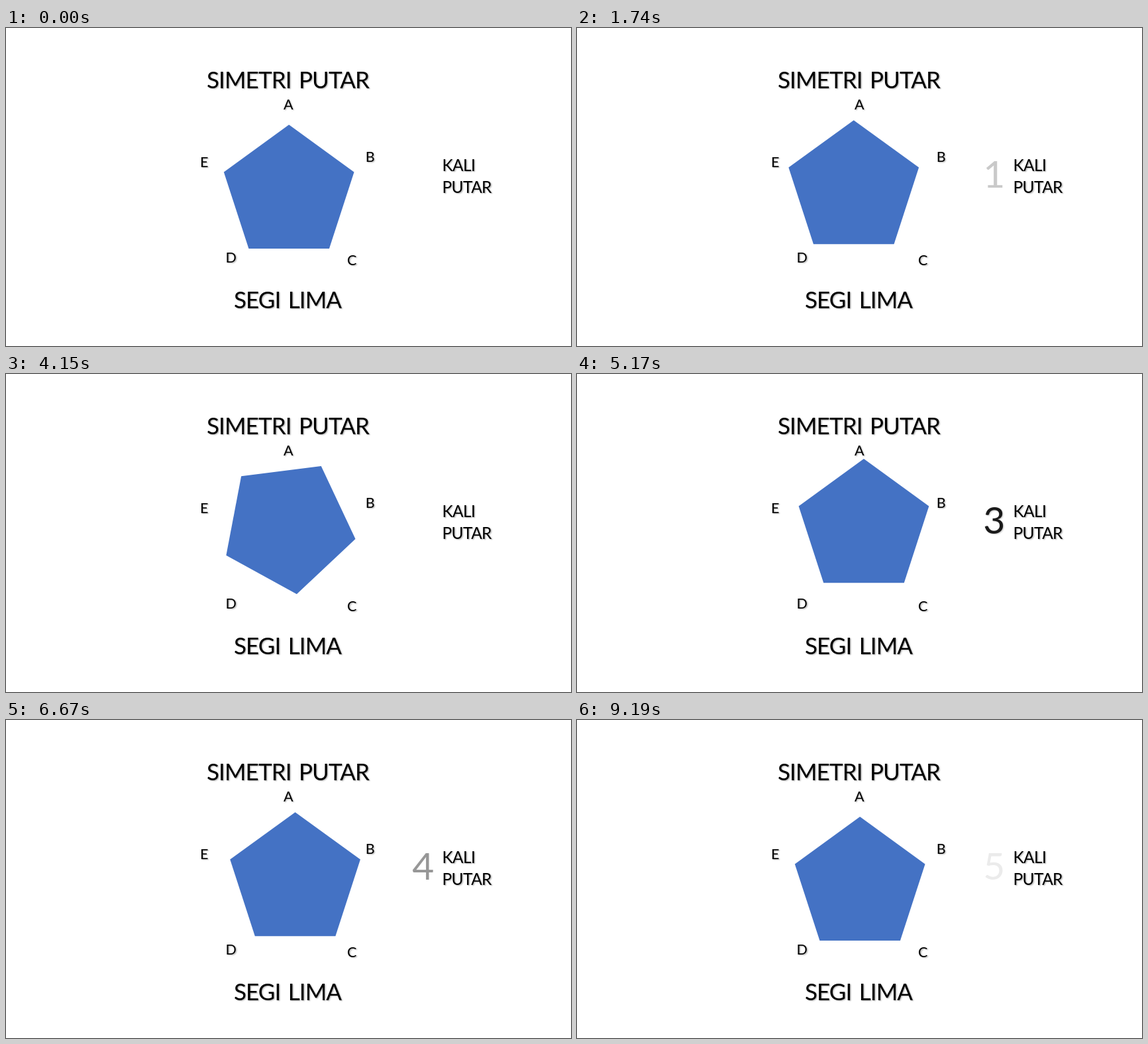
Write an HTML page with a canvas that moves like this. It is 853 by 480 pixels and loops after 9250 ms.

```html
<!DOCTYPE html>
<html lang="id">
<head>
<meta charset="utf-8">
<title>Simetri putar</title>
<style>
  html, body { margin: 0; width: 100%; height: 100%; overflow: hidden; background: #fff; }
  canvas { display: block; }
</style>
</head>
<body>
<canvas id="stage" width="853" height="480"></canvas>
<script>
const ctx = document.getElementById('stage').getContext('2d');
const LOOP = 9250, STEP = 60, HOLD_END = 3850;
const SPIN = 900, FADE = 450, GAP = 25;
const TURN = 2 * Math.PI / 5;
const starts = [30, 1860, 3790, 5590, 7393, LOOP];

// The shape turns about the middle of its bounding box, not its centroid.
const pivot = { x: 427.2, y: 239.5 }, radius = 103.4, drop = 9.9;

const clamp = v => Math.max(0, Math.min(1, v));

// Pictures advance in fixed steps, with one longer hold before the third turn.
function snap(t) {
  if (t >= HOLD_END) return HOLD_END + Math.floor((t - HOLD_END) / STEP) * STEP;
  return Math.min(Math.floor(t / STEP) * STEP, 3720);
}

// The shadow weakens faster than the glyphs, so faded text stays light.
function text(str, x, y, size, align = 'center', alpha = 1) {
  ctx.save();
  ctx.globalAlpha = alpha;
  ctx.font = `${size}px Lato, sans-serif`;
  ctx.letterSpacing = `${-0.025 * size}px`;
  ctx.wordSpacing = `${0.09 * size}px`;
  ctx.textAlign = align;
  ctx.fillStyle = '#000';
  ctx.shadowColor = `rgba(0,0,0,${0.33 * alpha ** 2})`;
  ctx.shadowOffsetX = ctx.shadowOffsetY = 1.3;
  ctx.shadowBlur = 2;
  ctx.fillText(str, x, y);
  ctx.restore();
}

function pentagon(angle) {
  ctx.save();
  ctx.translate(pivot.x, pivot.y);
  ctx.rotate(angle);
  ctx.beginPath();
  for (let i = 0; i < 5; i++) {
    ctx.lineTo(radius * Math.sin(i * TURN), drop - radius * Math.cos(i * TURN));
  }
  ctx.closePath();
  ctx.fillStyle = '#4472c4';
  ctx.fill();
  ctx.restore();
}

function draw(time) {
  const t = snap(time);
  let n = 0;
  while (n < 4 && t >= starts[n + 1]) n++;
  const local = t - starts[n];
  const length = starts[n + 1] - starts[n];

  ctx.fillStyle = '#fff';
  ctx.fillRect(0, 0, 853, 480);
  pentagon((n + clamp(local / SPIN)) * TURN);

  text('SIMETRI PUTAR', 425.5, 90.5, 35);
  text('SEGI LIMA', 425, 422.5, 35);
  text('KALI', 658.5, 215.5, 24.5, 'left');
  text('PUTAR', 658.5, 249, 24.5, 'left');
  text('A', 426, 123, 21.5);
  text('B', 549.5, 202, 21.5);
  text('C', 522, 358, 21.5);
  text('D', 339.5, 354, 21.5);
  text('E', 299, 210, 21.5);

  const alpha = clamp(Math.min((local - SPIN) / FADE, (length - GAP - local) / FADE));
  if (alpha > 0) text(String(n + 1), 629, 241, 57, 'center', alpha);
}

const begin = performance.now();
function frame() {
  draw((performance.now() - begin) % LOOP);
  requestAnimationFrame(frame);
}
frame();
</script>
</body>
</html>
```
